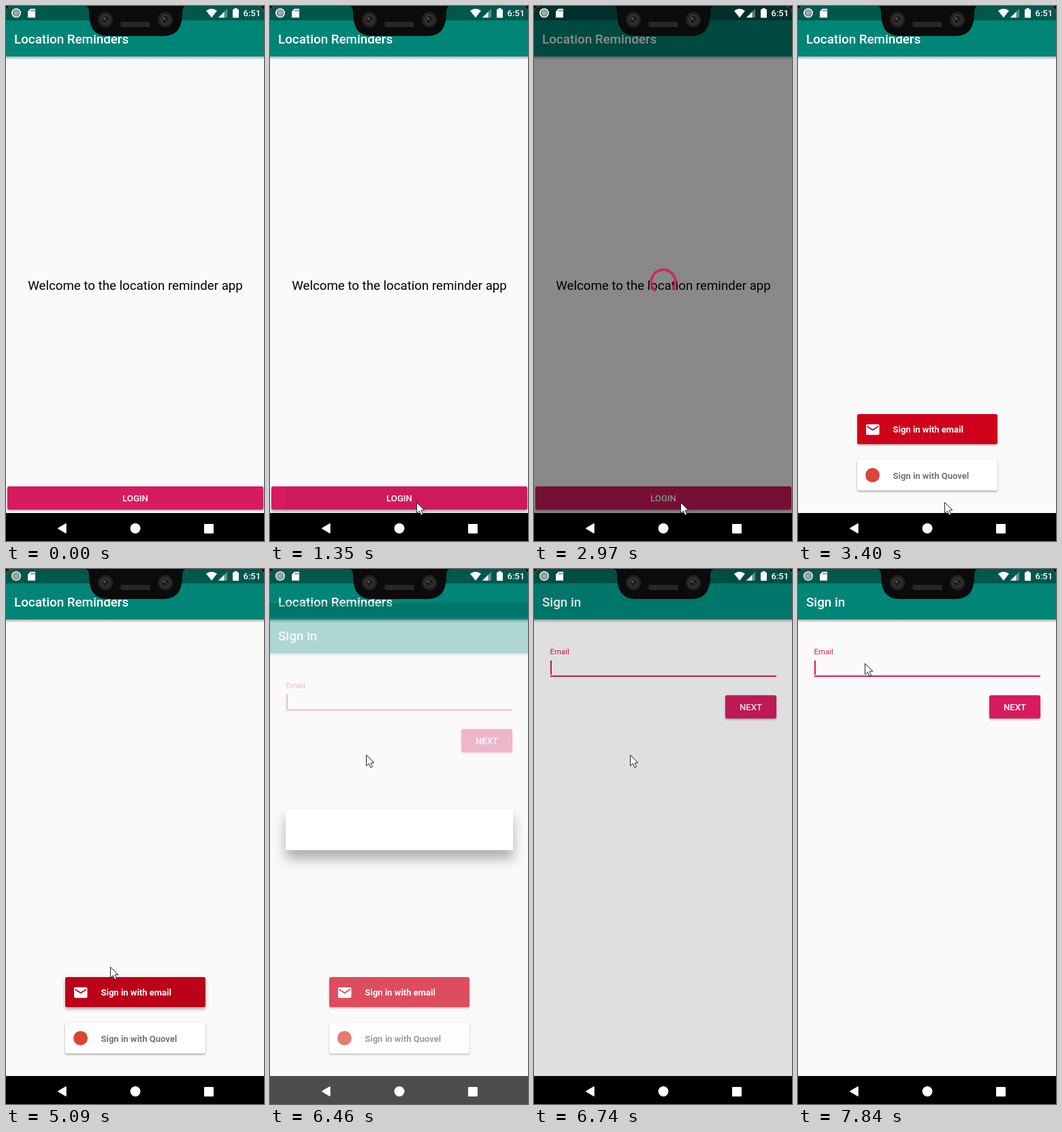
An HTML page with a canvas that plays this animation: 379x784 px, repeating every 8 s.

```html
<!DOCTYPE html>
<html lang="en">
<head>
<meta charset="utf-8">
<title>Location Reminders</title>
<style>
  html, body { margin: 0; width: 100%; height: 100%; overflow: hidden; background: #000; }
  canvas { display: block; width: 100vw; height: 100vh; }
</style>
</head>
<body>
<canvas id="stage" width="379" height="784"></canvas>
<script>
const W = 379, H = 784, LOOP = 8000, NAV_TOP = 743;
const PINK = '#d81b60', TEAL = '#008577', DARK_TEAL = '#00574b', PAPER = '#fafafa', RED = '#d0021b';
const stage = document.getElementById('stage').getContext('2d');
const layer = Object.assign(document.createElement('canvas'), { width: W, height: H }).getContext('2d');
let g = stage;

const clamp = v => Math.min(1, Math.max(0, v));
const ramp = (t, a, b) => clamp((t - a) / (b - a));
const easeOut = p => 1 - (1 - p) ** 2;
const easeInOut = p => p * p * (3 - 2 * p);
const mix = (a, b, p) => a + (b - a) * p;

// Value of a track of [time, value, ...] points, eased between points.
function track(points, t, ease = p => p) {
  let i = points.findIndex(p => p[0] > t);
  if (i === 0) return points[0].slice(1);
  if (i < 0) return points[points.length - 1].slice(1);
  const a = points[i - 1], b = points[i];
  const p = ease(ramp(t, a[0], b[0]));
  return a.slice(1).map((v, k) => mix(v, b[k + 1], p));
}

function rect(x, y, w, h, color) {
  g.fillStyle = color;
  g.fillRect(x, y, w, h);
}

function rounded(x, y, w, h, r, color) {
  g.fillStyle = color;
  g.beginPath();
  g.roundRect(x, y, w, h, r);
  g.fill();
}

function disc(x, y, r, color) {
  g.fillStyle = color;
  g.beginPath();
  g.arc(x, y, r, 0, Math.PI * 2);
  g.fill();
}

function poly(points, color) {
  g.fillStyle = color;
  g.beginPath();
  points.forEach(([x, y]) => g.lineTo(x, y));
  g.closePath();
  g.fill();
}

function text(str, x, y, size, weight, color, align = 'left') {
  g.font = `${weight} ${size}px Roboto, sans-serif`;
  g.textAlign = align;
  g.fillStyle = color;
  g.fillText(str, x, y);
}

// Raised card; lift goes from 0 (resting) to 1 (pressed).
function card(x, y, w, h, color, lift = 0) {
  g.save();
  g.shadowColor = 'rgba(0,0,0,.36)';
  g.shadowBlur = 3 + 3 * lift;
  g.shadowOffsetY = 1.5 + 1.5 * lift;
  rounded(x, y, w, h, 2.5, color);
  g.restore();
}

function ripple(x, y, w, h, cx, cy, grow, alpha) {
  if (alpha <= 0) return;
  g.save();
  g.beginPath();
  g.roundRect(x, y, w, h, 2.5);
  g.clip();
  disc(cx, cy, mix(20, w, grow), `rgba(0,0,0,${alpha})`);
  g.restore();
}

function appWindow(title) {
  rect(0, 0, W, H, PAPER);
  const shade = g.createLinearGradient(0, 74, 0, 79);
  shade.addColorStop(0, 'rgba(0,0,0,.28)');
  shade.addColorStop(1, 'rgba(0,0,0,0)');
  rect(0, 74, W, 5, shade);
  rect(0, 0, W, 21, DARK_TEAL);
  rect(0, 21, W, 53, TEAL);
  text(title, 12, 55, 18.8, 500, '#fff');
}

function navBar() {
  rect(0, NAV_TOP, W, H - NAV_TOP, '#000');
}

function welcomePage(t) {
  appWindow('Location Reminders');
  text('Welcome to the location reminder app', 190, 416, 18.7, 400, '#000', 'center');
  const press = Math.sin(Math.PI * ramp(t, 1230, 1550));
  card(2, 704, 376, 34, PINK, press);
  ripple(2, 704, 376, 34, 215, 727, ramp(t, 1230, 1480), .05 * press);
  text('LOGIN', 190, 726, 13.2, 500, '#fff', 'center');
  navBar();
}

function chooserPage(t) {
  appWindow('Location Reminders');
  const [tint, lift] = track([[4200, 0, 0], [4470, .12, 1], [5010, .12, 1],
    [5300, .05, 0], [5790, .05, 0], [5920, 0, 0]], t);
  card(87, 598, 206, 44, RED, lift);
  ripple(87, 598, 206, 44, 154, 611, ramp(t, 4200, 4470), tint);
  rounded(100, 613, 19.5, 15.5, 2, '#fff');
  g.strokeStyle = RED;
  g.lineWidth = 1.9;
  g.beginPath();
  g.moveTo(101.5, 616);
  g.lineTo(109.75, 621.3);
  g.lineTo(118, 616);
  g.stroke();
  text('Sign in with email', 139.5, 625, 13, 700, '#fff');
  card(87, 665, 206, 45, '#fff');
  disc(109.5, 687.5, 10.5, '#db4437');
  text('Sign in with Quovel', 139.5, 692.5, 13, 700, '#757575');
  navBar();
}

function signInPage(t) {
  appWindow('Sign in');
  text('Email', 23.5, 125, 11.4, 400, PINK);
  rect(24, 156, 332, 2, PINK);
  if (t < 7140 || t >= 7640) rect(24, 134, 2, 21, PINK);
  card(281, 185, 75, 34, PINK);
  text('NEXT', 318.5, 207, 13.2, 500, '#fff', 'center');
  navBar();
}

// Draws a page as one translucent sheet, shifted down by dy.
function sheet(page, t, dy, alpha) {
  g = layer;
  g.clearRect(0, 0, W, H);
  page(t);
  g = stage;
  g.save();
  g.globalAlpha = alpha;
  g.drawImage(layer.canvas, 0, dy);
  g.restore();
}

function dim(alpha) {
  if (alpha > 0) rect(0, 0, W, H, `rgba(0,0,0,${alpha})`);
}

function spinner(t) {
  const held = t < 2370 ? t : t < 2570 ? 2370 : t < 2970 ? 2570 : 2970;
  const age = held - 2300, rad = Math.PI / 180;
  const start = -72 + .3 * age;
  const sweep = Math.min(270, Math.max(12, 67 + .55 * age));
  g.save();
  g.globalAlpha = .85 * ramp(t, 2100, 2260);
  g.strokeStyle = PINK;
  g.lineWidth = 3.8;
  g.beginPath();
  g.arc(190, 404, 17.6, start * rad, (start + sweep) * rad);
  g.stroke();
  g.restore();
}

function blankDialog(t) {
  g.save();
  g.globalAlpha = 1 - ramp(t, 6480, 6700);
  g.shadowColor = 'rgba(0,0,0,.3)';
  g.shadowBlur = 18;
  g.shadowOffsetY = 13;
  rounded(23, 352, 334, 60, 1, '#fff');
  g.restore();
}

function statusIcons() {
  disc(15, 10.3, 7, '#e4ebea');
  disc(15, 10.3, 5.2, '#5f8580');
  disc(15, 10.3, 3.8, '#a3aaa8');
  poly([[36, 4], [43, 4], [43, 17], [32, 17], [32, 8]], '#fff');
  for (const x of [36.5, 38.7, 40.9]) rect(x, 5.5, 1, 2.5, DARK_TEAL);
  g.fillStyle = '#fff';
  g.beginPath();
  g.moveTo(302, 17);
  g.lineTo(294, 7);
  g.quadraticCurveTo(302, .8, 310, 7);
  g.closePath();
  g.fill();
  poly([[325, 4], [325, 17], [312, 17]], 'rgba(255,255,255,.35)');
  poly([[320.5, 8.5], [320.5, 17], [312, 17]], '#fff');
  rounded(333, 4.8, 9, 12.4, 1, '#fff');
  rect(335.5, 3.2, 4, 2, '#fff');
  text('6:51', 348.5, 15.2, 13, 500, '#fff');
}

function navIcons() {
  g.lineJoin = 'round';
  g.lineWidth = 1.5;
  g.strokeStyle = '#fff';
  poly([[77, 765.5], [88, 759], [88, 772]], '#fff');
  g.stroke();
  disc(190, 765.5, 7.5, '#fff');
  rounded(291, 759, 14, 14, 1.2, '#fff');
}

function camera(x, y) {
  disc(x, y, 11, '#252320');
  disc(x, y, 7.5, '#36322e');
  disc(x, y, 5, '#1d1b1a');
  disc(x - 1.5, y - 1.5, 1.8, '#5b5650');
  disc(x + 2, y + 2, 1, '#4c4843');
}

function corner(x, flip) {
  g.save();
  g.translate(x, 0);
  g.scale(flip, 1);
  g.fillStyle = '#111';
  g.beginPath();
  g.moveTo(0, 0);
  g.lineTo(9, 0);
  g.quadraticCurveTo(1, 1, 0, 10);
  g.fill();
  g.strokeStyle = 'rgba(150,140,140,.6)';
  g.lineWidth = 1;
  g.beginPath();
  g.moveTo(8, 0);
  g.quadraticCurveTo(1, 1, 0, 9);
  g.stroke();
  g.restore();
}

function notch() {
  g.fillStyle = '#0b0b0b';
  g.beginPath();
  g.moveTo(117, 0);
  g.quadraticCurveTo(122, 1, 122, 9);
  g.bezierCurveTo(122, 32, 130, 44, 150, 44);
  g.lineTo(231, 44);
  g.bezierCurveTo(251, 44, 259, 32, 259, 9);
  g.quadraticCurveTo(259, 1, 264, 0);
  g.fill();
  camera(146, 20);
  camera(234, 20);
  rounded(168, 23, 44, 8, 2, '#1c1c1c');
  for (let row = 0; row < 4; row++)
    for (let x = 169 + row % 2; x < 211; x += 2) rect(x, 24 + row * 1.8, 1, 1, '#444');
  corner(0, 1);
  corner(W, -1);
}

const pointerPath = [
  [320, 286, 770], [810, 215, 729], [940, 215, 729], [1010, 215, 727],
  [3790, 215, 727], [4070, 154, 611], [4940, 154, 611], [5790, 141, 272],
  [6760, 141, 272], [7170, 102, 162], [7230, 102, 162], [7570, 98, 138]
];
const clicks = [[1080, 1210], [4270, 4400], [7640, 7840]];

function pointer(t) {
  if (t < 320) return;
  const [x, y] = track(pointerPath, t, easeInOut);
  if (clicks.some(([a, b]) => t >= a && t < b)) disc(x, y, 12, 'rgba(120,120,120,.25)');
  g.save();
  g.translate(x + .5, y + .5);
  g.lineJoin = 'miter';
  g.lineWidth = 1;
  g.strokeStyle = '#222';
  poly([[0, 0], [0, 16], [3.8, 12.6], [6.4, 18.4], [9, 17.2], [6.5, 11.6], [11.4, 11.4]], '#fff');
  g.stroke();
  g.restore();
}

function draw(t) {
  g = stage;
  if (t < 3400) {
    welcomePage(t);
    dim(.456 * ramp(t, 1760, 2260) * (1 - ramp(t, 3060, 3330)));
    if (t >= 2100 && t < 3120) spinner(t);
    if (t >= 3120) {
      const p = easeOut(ramp(t, 3050, 3400));
      sheet(chooserPage, t, 62 * (1 - p), p);
    }
  } else if (t < 6460) {
    chooserPage(t);
  } else if (t < 6680) {
    chooserPage(t);
    const p = ramp(t, 6460, 6680);
    sheet(signInPage, t, 50 * (1 - easeOut(p)), mix(.3, 1, p));
  } else {
    signInPage(t);
  }
  if (t >= 6460) {
    dim(track([[6460, 0], [6600, .2], [6740, .11], [6900, 0]], t)[0]);
    if (t < 6700) blankDialog(t);
  }
  statusIcons();
  navIcons();
  notch();
  pointer(t);
}

function tick() {
  draw(performance.now() % LOOP);
  requestAnimationFrame(tick);
}
tick();
</script>
</body>
</html>
```
